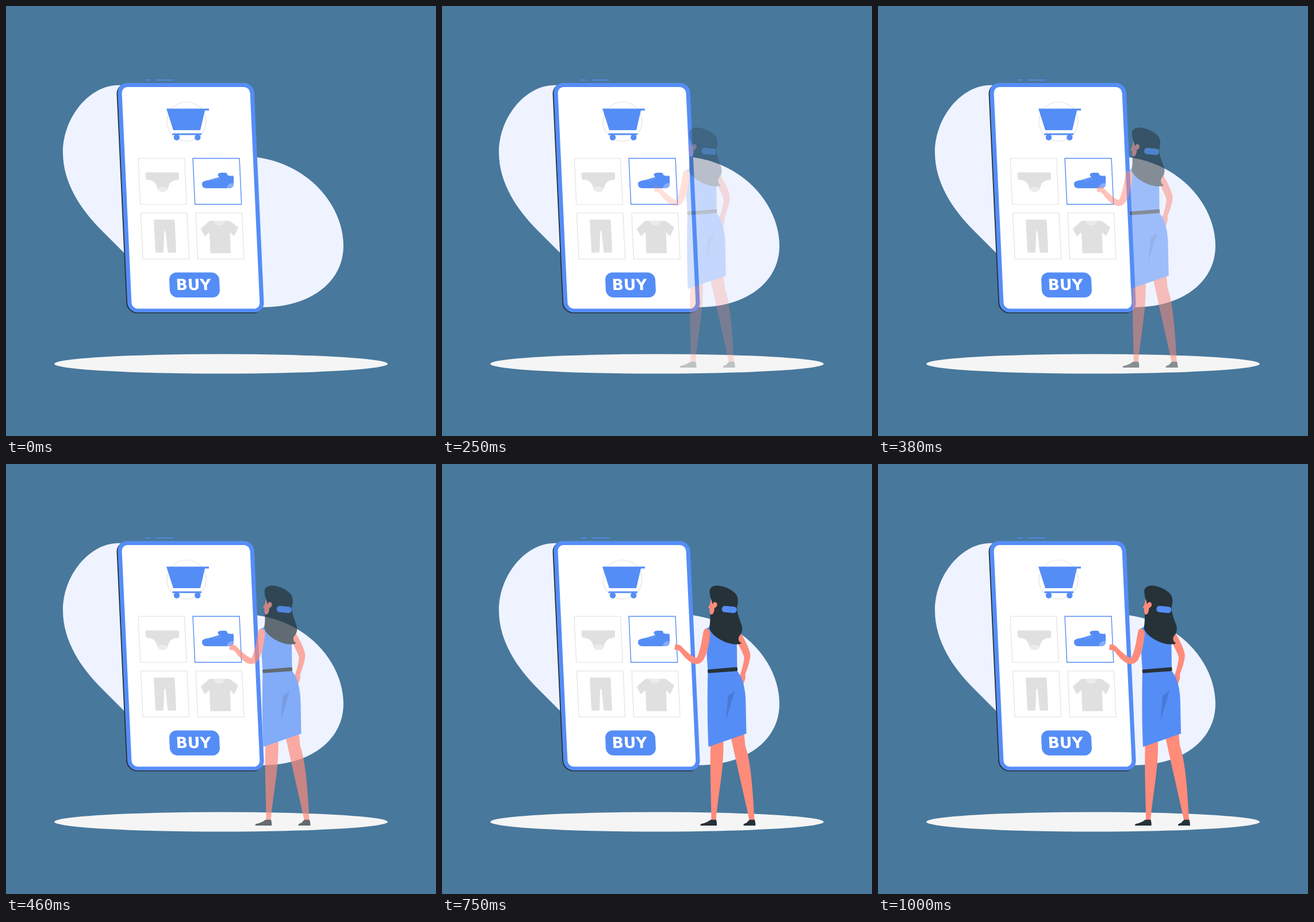
An HTML page for the animation above (1.04 s loop, 748 by 748 pixels).

```html
<!DOCTYPE html>
<html lang="en">
<head>
<meta charset="utf-8">
<title>Online shopping</title>
<style>
  html, body { margin: 0; width: 100%; height: 100%; overflow: hidden; background: #48789c; }
  svg { display: block; width: 100%; height: 100%; }
  .blue { fill: #558df6; }
  .pale { fill: #86adf9; }
  .dark { fill: #263238; }
  .skin { fill: #ff8b7b; }
  .gray { fill: #e0e0e0; }
  .light { fill: #ebebeb; }
  .card { fill: none; stroke: #e0e0e0; stroke-width: 1.1; }
  .picked { stroke: #558df6; stroke-width: 1.4; }
  .lace { fill: none; stroke: #86adf9; stroke-width: 1; }
  .label { font: bold 26.6px "DejaVu Sans", Verdana, sans-serif; fill: #fff; }
</style>
</head>
<body>
<svg viewBox="0 0 748 748">
  <path fill="#eef3ff" d="M200 138C150 134 99 190 99 255C99 308 131 355 166 390L208 432L300 500L446 524C530 524 587 480 587 417C587 350 530 276 436 263L300 200Z"/>
  <ellipse cx="374" cy="622.5" rx="290" ry="17" fill="#f5f5f5"/>

  <path class="blue" d="M242 128h9v1.6h-9zM260.500 128h31v1.6h-31z"/>

  <!-- phone, leaning: x shifts by .046 per pixel below y 134 -->
  <g transform="matrix(1 0 .046 1 -6.16 0)">
    <rect class="dark" x="191.700" y="135" width="238" height="399.500" rx="18"/>
    <rect class="blue" x="193.500" y="134" width="237.500" height="399" rx="17"/>
    <rect x="200.800" y="141" width="223" height="385.500" rx="10.500" fill="#fff"/>
    <rect class="card" x="224" y="265" width="80.500" height="80"/>
    <rect class="card picked" x="319" y="265" width="81" height="80"/>
    <rect class="card" x="224" y="360" width="80.500" height="80"/>
    <rect class="card" x="319.500" y="360" width="80.500" height="80"/>
    <rect class="blue" x="268.300" y="463.500" width="87" height="43.500" rx="13"/>
    <text class="label" x="279.400" y="494.500">BUY</text>
  </g>

  <!-- cart -->
  <circle class="card" cx="314" cy="201" r="34"/>
  <path class="blue" d="M279 178.500H353V181.700H346L338 216H291ZM289.500 221.500H340V224.500H289.500Z"/>
  <circle class="blue" cx="297" cy="228.500" r="5.200"/>
  <circle class="blue" cx="333.300" cy="228.500" r="5.200"/>

  <!-- goods -->
  <path class="gray" d="M242.500 292Q242.500 289.500 245 289.500H298.500Q301 289.500 301 292V300Q301 302.500 298 302.500C288 303 284 308 282 316Q280 323 272.500 323Q264 323 263 316C261 308 257 303 247 302.500Q243.500 302 243.300 300Z"/>
  <path class="light" d="M263.500 318Q266 314 272.500 314Q279 314 281.500 318Q279.500 323.500 272.500 323.500Q265.500 323.500 263.500 318Z"/>

  <path class="blue" d="M341 311C340 305 346 304 352 303C360 301 366 299 371 297.500Q367.500 295 369 292Q371 289.500 376 290H381Q385 290 385 294Q390 296.500 394 295Q396 295 396 299V309Q396 317 388 317H349Q342 317 341 311Z"/>
  <path class="pale" d="M396.500 308Q386 307 384 317H388Q396 317 396.500 308Z"/>
  <path class="lace" d="M358 301l6 4M363 299.500l6 4M368 298l5 4"/>

  <path class="gray" d="M257 373Q257 371.500 259 371.500H292Q293.500 371.500 293.500 373L296 427Q296 429 294 429H283Q281.500 429 281.200 427L277.500 391.500H275.500L274 427Q274 429 272 429H262Q260 429 260 427Z"/>
  <path class="gray" d="M354 373.700H389L404 385L397 400.500L389.800 393.500L391 430H355.500L354 393.500L346 400.500L338.500 387.500Z"/>
  <path class="light" d="M361.500 373.700H380Q379 382 371 382Q363 382 361.500 373.700Z"/>

  <g id="shopper" opacity="0">
    <path class="skin" d="M516 292C523 303 533 322 534 333C533 345 528 358 525 366L525.500 372L522 383L514 376L515.500 369C520 355 523 345 523 335C519 325 514 315 510 308Z"/>
    <path class="skin" d="M465 480H487C488 530 480 560 474 620H466C466 580 463 540 465 480Z"/>
    <path class="skin" d="M500 475L523 468L525 490C534 515 538 560 541 619H532C525 585 514 540 500 475Z"/>
    <path class="dark" d="M447 628Q447 625.500 453 625Q460 623 465 618.700H474.500Q476 624 475.700 629H447Z"/>
    <path class="dark" d="M522 628Q522 625.500 527 624.500L532.500 618.700H541.500Q543 624 543 629H522Z"/>
    <path class="blue" d="M456 287L463 283L514 295Q509 304 510.500 318L511 360C521 372 526 392 526 420L527 469L461 492C459 450 459 400 460 360L458 330L463 300Z"/>
    <path fill="#4979d6" d="M495 403.500L507 394.500L491.500 446Z"/>
    <path class="dark" d="M459.500 359Q459.500 357.700 461 357.600L510 353.400Q511.500 353.400 511.500 355V359Q511.500 360.200 510 360.300L461.500 363.800Q460 364 460 362.500Z"/>
    <path class="skin" d="M456 286.500C462 287 465.500 291 463.500 299C462 315 458 332 452 341C447 348.500 440 349.500 432 346C425 342 418 335 412 326.500L408 323.500Q402.500 324.500 401.800 321.500L403.500 313.500Q410 313.500 414 317C422 326 432 334 440 338C446 328 449 310 452 293Q453 287 456 286.500Z"/>
    <path class="dark" d="M463 220C465 213 471 211 478 211.500C492 213 506 221 510.500 229C514 238 511.500 244 510.500 250C511 262 516 272 519 281C521 289 519 295 515 299C511.500 304 514 310 518.500 311.500Q516 313.800 512 313.500C500 315 483 308 472 299Q463 291 462.500 284C464 278 464 271 464 262L467 238Q463.500 232 463 220Z"/>
    <path class="skin" d="M465.500 235L463.500 244L460.500 250L463 251.500Q462.500 262 466 262Q471 261 471.500 250.500Q477 248.500 476 243Q473.500 238.500 470 241L468.500 244Z"/>
    <rect class="blue" x="484.300" y="247.500" width="26" height="11" rx="5.300" transform="rotate(5 497.300 253)"/>
  </g>
</svg>
<script>
  const shopper = document.getElementById("shopper");
  const LOOP = 1040, STEP = 1000 / 24, LAST = 24, REACH = 45;

  const bezier = (a, b, u) => 3 * a * u * (1 - u) ** 2 + 3 * b * u * u * (1 - u) + u ** 3;

  // Ease with overshoot, cubic-bezier(.36, -.01, .5, 1.38)
  function ease(x) {
    let lo = 0, hi = 1;
    for (let i = 0; i < 24; i++) {
      const mid = (lo + hi) / 2;
      if (bezier(0.36, 0.5, mid) < x) lo = mid; else hi = mid;
    }
    return bezier(-0.01, 1.38, lo);
  }

  function draw(time) {
    // the slide advances 24 times a second
    const step = Math.min(LAST, Math.floor((time % LOOP + 4) / STEP));
    const p = step ? ease(Math.min(1, step / LAST + 0.02)) : 0;
    shopper.setAttribute("transform", `translate(${(p - 1) * REACH} 0)`);
    shopper.setAttribute("opacity", Math.max(0, Math.min(1, p)));
  }

  const start = performance.now();
  function tick() {
    draw(performance.now() - start);
    requestAnimationFrame(tick);
  }
  tick();
</script>
</body>
</html>
```
